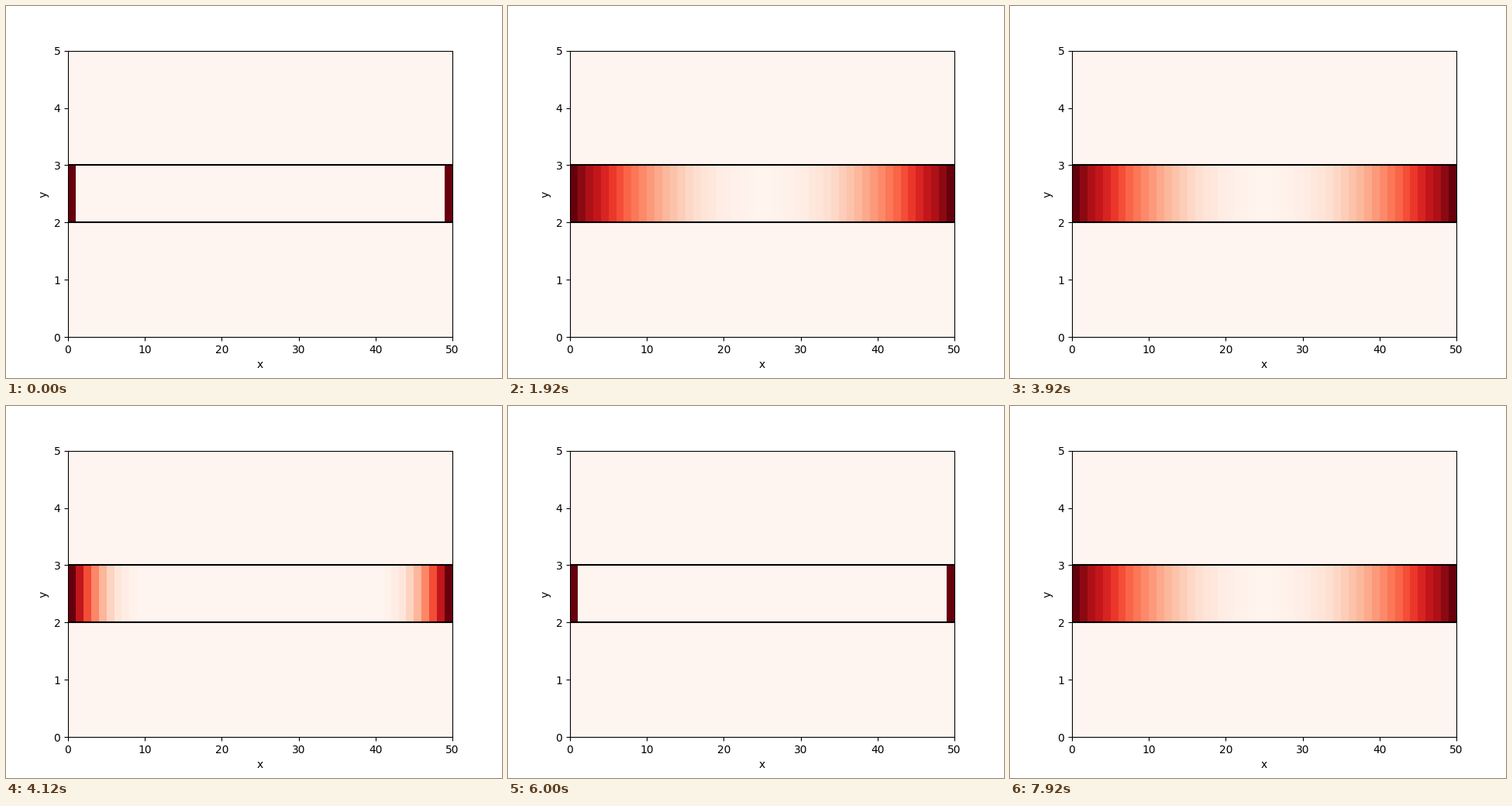
Write a matplotlib script that moves like this. It is 640 px wide and 480 px high and loops after 8 s.

```python
import numpy as np
import matplotlib.pyplot as plt
from matplotlib.animation import FuncAnimation

NX, NY = 50, 5
CYCLE, LOOPS = 50, 4        # frames per diffusion run, runs per loop
INTERVAL = 40
SUBSTEPS = 10
DIFFUSION = 2.25            # cells^2 per frame
UPTAKE = 0.0054             # constant loss per frame


def advance(u):
    """Diffuse one frame with fixed ends and constant uptake."""
    u = u.copy()
    for _ in range(SUBSTEPS):
        lap = u[:-2] - 2 * u[1:-1] + u[2:]
        u[1:-1] += (DIFFUSION * lap - UPTAKE) / SUBSTEPS
        u = np.maximum(u, 0)
    return u


def simulate():
    u = np.zeros(NX)
    u[0] = u[-1] = 1
    states = [u]
    for _ in range(CYCLE - 1):
        states.append(advance(states[-1]))
    return states


states = simulate()


def field(n):
    grid = np.zeros((NY, NX))
    grid[2] = states[n % CYCLE]
    return grid


fig, ax = plt.subplots(figsize=(6.4, 4.8), dpi=100)
mesh = ax.pcolormesh(np.arange(NX + 1), np.arange(NY + 1), field(0),
                     cmap="Reds", vmin=0, vmax=1)
for y in (2, 3):
    ax.axhline(y, color="black", lw=1.5)
ax.set(xlim=(0, NX), ylim=(0, NY), xlabel="x", ylabel="y")


def update(n):
    mesh.set_array(field(n))
    return [mesh]


anim = FuncAnimation(fig, update, frames=CYCLE * LOOPS, interval=INTERVAL,
                     repeat=True, repeat_delay=0, blit=False)
plt.show()
```
